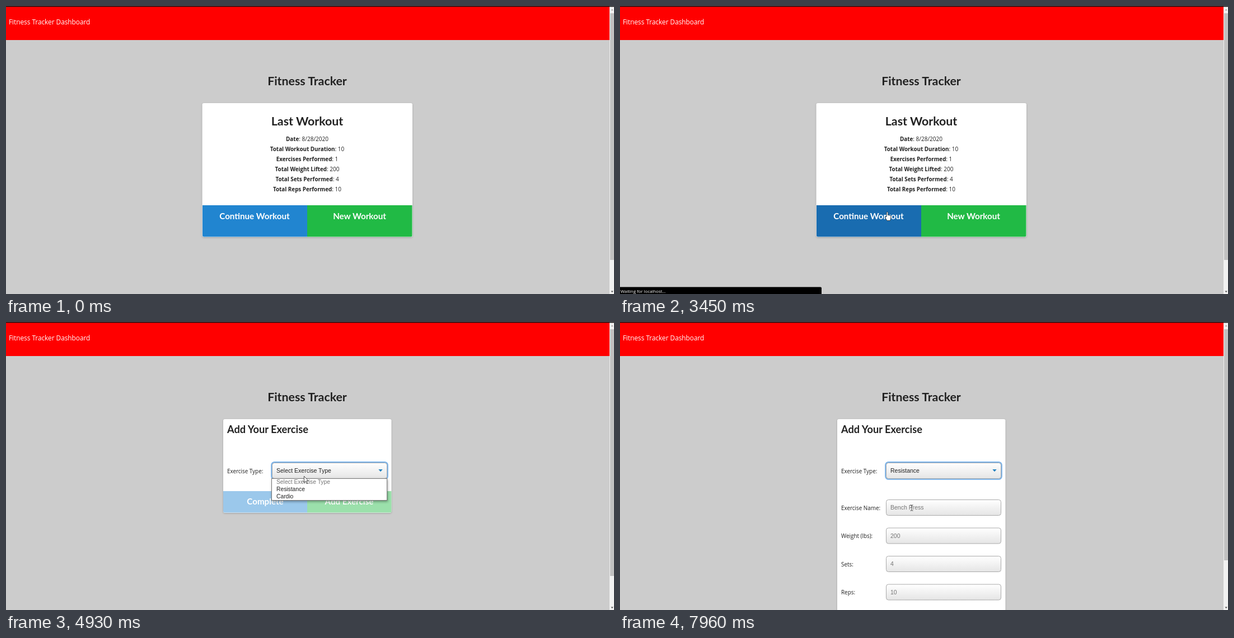
An HTML page that plays this animation: 1086x516 px, repeating every 8000 ms.

```html
<!DOCTYPE html>
<html lang="en">
<head>
<meta charset="utf-8">
<title>Fitness Tracker</title>
<style>
  html, body { margin: 0; width: 100%; height: 100%; overflow: hidden; background: #ccc; }
  svg { display: block; width: 1086px; height: 516px; }
  text { fill: #212121; white-space: pre; }
  .lato { font-family: Lato, sans-serif; font-weight: 700; }
  .mid { text-anchor: middle; }
  .h1 { font-size: 21.3px; }
  .h2 { font-size: 18.2px; }
  .btn { font-size: 15.15px; fill: #fff; }
  .ui { font-family: "Open Sans", "Noto Sans", sans-serif; font-size: 9.9px; }
  .stat { font-size: 10px; }
  .stat tspan { font-size: 9.83px; font-weight: 700; }
  .nav { font-size: 11.8px; fill: #fff; }
  .small { font-size: 7.8px; fill: #fff; }
  .arial { font-family: "Liberation Sans", Arial, sans-serif; font-size: 10.5px; }
  .option { font-size: 10.3px; }
  .hint { fill: #757575; }
  .card { fill: #fff; filter: drop-shadow(0 1px 1.5px rgba(0, 0, 0, .22)); }
  .field { fill: url(#shade); stroke: #aaa; }
  .list { fill: #fff; stroke: #767676; filter: drop-shadow(1px 2px 2px rgba(0, 0, 0, .35)); }
</style>
</head>
<body>
<svg viewBox="0 0 1086 516">
  <defs>
    <linearGradient id="shade" x2="0" y2="1">
      <stop offset="0" stop-color="#fff"/>
      <stop offset="1" stop-color="#e5e5e5"/>
    </linearGradient>
  </defs>

  <rect width="1086" height="516" fill="#ccc"/>
  <rect y="1" width="1078" height="60" fill="#f00"/>
  <text class="ui nav" x="5" y="33">Fitness Tracker Dashboard</text>
  <rect x="1078" width="8" height="516" fill="#f1f1f1"/>
  <rect id="thumb" x="1079" y="13" width="7" height="442" fill="#c1c1c1"/>
  <path d="M1080.5 8l2.2-2.6 2.2 2.6z" fill="#a3a3a3"/>
  <path d="M1080.5 510.5h4.4l-2.2 2.8z" fill="#505050"/>
  <rect width="1086" height="1.4" fill="#151515"/>
  <text class="lato mid h1" x="538" y="142">Fitness Tracker</text>

  <g id="summary">
    <rect class="card" x="350.5" y="174" width="375.5" height="240" rx="3"/>
    <text class="lato mid h1" x="538" y="214">Last Workout</text>
    <g id="stats"></g>
    <path id="blue" d="M351 357h187v56.5h-184.5q-2.5 0-2.5-2.5z"/>
    <path id="green" d="M538 357h187.5v54q0 2.5-2.5 2.5h-185z"/>
    <text class="lato mid btn" x="444" y="382">Continue Workout</text>
    <text class="lato mid btn" x="631.5" y="382">New Workout</text>
  </g>

  <g id="form">
    <rect id="panel" class="card" x="388" y="174" width="300.5" height="168" rx="3"/>
    <text class="lato h2" x="395" y="199">Add Your Exercise</text>
    <text class="ui" x="395" y="271">Exercise Type:</text>
    <g id="actions">
      <path d="M388 303h150v38.5h-147.5q-2.5 0-2.5-2.5z" fill="#9bc8eb"/>
      <path d="M538 303h150.5v36q0 2.5-2.5 2.5h-148z" fill="#9be0ab"/>
      <text class="lato mid btn" x="463" y="327">Complete</text>
      <text class="lato mid btn" x="613" y="327">Add Exercise</text>
    </g>
    <g id="fields"></g>
    <rect id="ring" x="474.5" y="251.3" width="207" height="30.2" rx="5" fill="none" stroke="#78b2ea" stroke-width="2.6"/>
    <rect class="field" x="475.5" y="252.5" width="205" height="28" rx="4"/>
    <path d="M665.3 264h7.4l-3.7 4.2z" fill="#1f80bf"/>
    <text id="choice" class="arial" x="483" y="270"></text>
    <g id="list">
      <rect class="list" x="474.5" y="280.5" width="206" height="39"/>
      <rect id="mark" x="475" y="293" width="205" height="13" fill="#1e90ff"/>
      <text class="arial option hint" x="483" y="290">Select Exercise Type</text>
      <text id="first" class="arial option" x="483" y="303">Resistance</text>
      <text class="arial option" x="483" y="316">Cardio</text>
    </g>
  </g>

  <g id="status">
    <path id="bubble"/>
    <text id="message" class="ui small" x="1" y="514"></text>
  </g>

  <circle id="click" r="8" fill="#f5e63c" fill-opacity=".7"/>
  <g id="cursor" stroke="#222" stroke-width=".8" stroke-linejoin="round" fill="#fff">
    <path id="arrow" d="M.4.3V11.8L3 9.3 5 13.6 6.7 12.8 4.8 8.6H8.4Z"/>
    <path id="hand" d="M-.8 8V1.2a1.2 1.2 0 0 1 2.4 0V5.5l4 .9q1.6.4 1.4 2.2L6.3 12.5 5.5 15.5H0L-3 10.8q-.8-1.8.9-1.7z"/>
    <path id="beam" d="M-2.5-5h2l.5.5.5-.5h2M-2.5 5h2l.5-.5.5.5h2M0-4.500v9" fill="none"/>
  </g>
</svg>
<script>
const LOOP = 8000;
const STEP = 78; // screen update interval of the pointer
const $ = Object.fromEntries([...document.querySelectorAll('[id]')].map(e => [e.id, e]));

const stats = {
  'Date': '8/28/2020', 'Total Workout Duration': 10, 'Exercises Performed': 1,
  'Total Weight Lifted': 200, 'Total Sets Performed': 4, 'Total Reps Performed': 10
};
$.stats.innerHTML = Object.entries(stats).map(([name, value], i) =>
  `<text class="ui mid stat" x="538" y="${242 + 18 * i}"><tspan>${name}</tspan>: ${value}</text>`).join('');

const fields = { 'Exercise Name:': 'Bench Press', 'Weight (lbs):': 200, 'Sets:': 4, 'Reps:': 10 };
$.fields.innerHTML = Object.entries(fields).map(([name, hint], i) => {
  const y = 318.5 + 50.5 * i;
  return `<text class="ui" x="395" y="${y + 18}">${name}</text>
    <rect class="field" x="475.5" y="${y}" width="205" height="28" rx="4"/>
    <text class="arial hint" x="483" y="${y + 17.5}">${hint}</text>`;
}).join('');

// Each move eases from the last resting point, optionally bent towards a point
const entry = [1670, 910];
const moves = [
  { from: 210, to: 610, end: [549, 298], bend: [700, 300] },
  { from: 690, to: 1050, end: [594, 316] },
  { from: 1190, to: 1510, end: [599, 276] },
  { from: 1590, to: 2120, end: [619, 259] },
  { from: 2270, to: 2900, end: [477, 369], bend: [640, 400] },
  { from: 3920, to: 4470, end: [532, 276] },
  { from: 5310, to: 5470, end: [532, 300] },
  { from: 5700, to: 5930, end: [532, 305] },
  { from: 6160, to: 6860, end: [532, 303] },
  { from: 7640, to: 7960, end: [521, 333] }
];

function tipAt(t) {
  let tip = entry;
  for (const { from, to, end, bend } of moves) {
    if (t < from) break;
    const count = Math.round((to - from) / STEP) + 1;
    const done = Math.floor((t - from) / (to - from) * (count - 1) + 0.01) + 1;
    const k = 1 - (1 - Math.min(1, done / count)) ** 3;
    tip = tip.map((a, i) => {
      const mid = bend ? bend[i] : (a + end[i]) / 2;
      return a * (1 - k) ** 2 + 2 * mid * k * (1 - k) + end[i] * k * k;
    });
  }
  return tip;
}

function show(el, on) { el.style.display = on ? '' : 'none'; }

function draw(t) {
  const during = (from, to) => t >= from && t < to;
  const [x, y] = tipAt(t);
  const onForm = t >= 3600;
  const chosen = t >= 7250;
  const onButton = during(2270, 3600) && y > 357;
  const onField = chosen && y > 318;

  show($.summary, !onForm);
  $.blue.setAttribute('fill', onButton && x < 538 ? '#196cb0' : '#2185d0');
  $.green.setAttribute('fill', onButton && x >= 538 ? '#16ab39' : '#21ba45');

  show($.form, onForm);
  show($.actions, !chosen);
  show($.fields, chosen);
  $.panel.setAttribute('height', chosen ? 420 : 168);
  $.thumb.setAttribute('height', chosen ? 414 : 442);
  show($.ring, t >= 4850);
  $.choice.textContent = chosen ? 'Resistance' : 'Select Exercise Type';
  show($.list, during(4930, 7250));
  const marked = y >= 293;
  show($.mark, marked);
  $.first.style.fill = marked ? '#fff' : '';

  const waiting = t >= 3450;
  show($.status, during(3050, 3920));
  $.status.setAttribute('opacity', t < 3140 ? 0.5 : 1);
  $.bubble.setAttribute('d', `M0 503.5H${waiting ? 358 : 202}q2 0 2 2V516H0z`);
  $.message.textContent = waiting ? 'Waiting for localhost...' : 'localhost:3000/exercise?id=5f4926a1c30b7e29d846f';

  show($.click, during(3370, 3450) || during(4850, 4930) || during(7100, 7250));
  $.click.setAttribute('cx', x);
  $.click.setAttribute('cy', y);
  show($.cursor, t >= moves[0].from);
  $.cursor.setAttribute('transform', `translate(${x} ${y})`);
  show($.hand, onButton);
  show($.beam, onField);
  show($.arrow, !onButton && !onField);
}

let begin;
function tick(now) {
  begin ??= now;
  draw((now - begin) % LOOP);
  requestAnimationFrame(tick);
}
draw(0);
requestAnimationFrame(tick);
</script>
</body>
</html>
```
